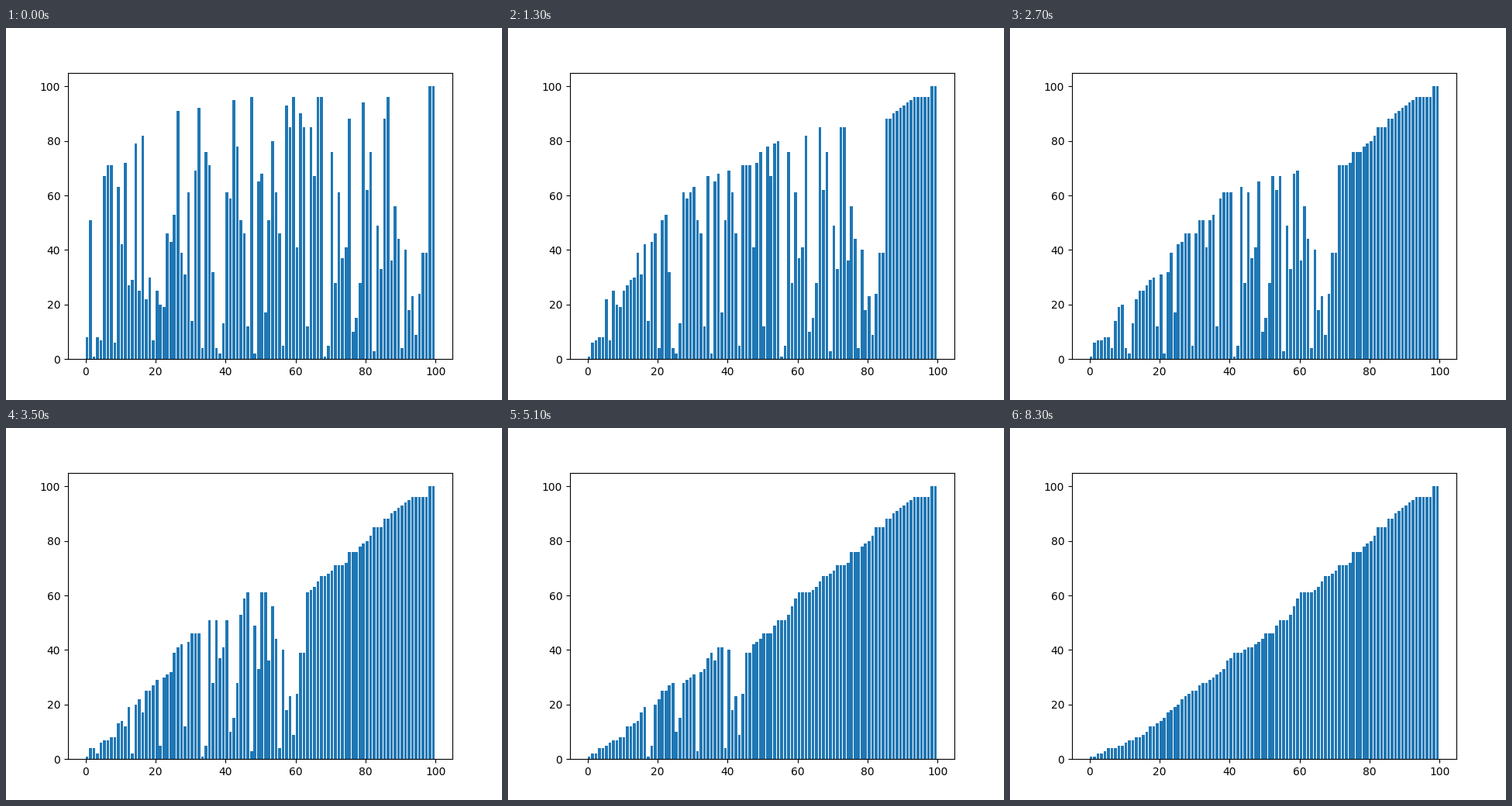
A matplotlib script for the animation above (9.9 s loop, 640x480 px).

```python
import matplotlib.pyplot as plt
from matplotlib.animation import FuncAnimation

STEP_MS = 100
FRAMES = 99

START = [
    8, 51, 1, 8, 7, 67, 71, 71, 6, 63,
    42, 72, 27, 29, 79, 25, 82, 22, 30, 7,
    25, 20, 19, 46, 43, 53, 91, 39, 31, 61,
    14, 69, 92, 4, 76, 71, 32, 4, 2, 13,
    61, 59, 95, 78, 51, 46, 12, 96, 2, 65,
    68, 17, 51, 80, 61, 46, 5, 93, 85, 96,
    41, 90, 85, 12, 85, 67, 96, 96, 1, 5,
    76, 28, 61, 37, 41, 88, 10, 15, 28, 94,
    62, 76, 3, 49, 33, 88, 96, 36, 56, 44,
    4, 40, 18, 23, 9, 24, 39, 39, 100, 100,
]


def bubble_pass(values):
    """Return a copy of values after one left-to-right bubble sort pass."""
    out = list(values)
    for i in range(len(out) - 1):
        if out[i] > out[i + 1]:
            out[i], out[i + 1] = out[i + 1], out[i]
    return out


states = [START]
while len(states) < FRAMES:
    states.append(bubble_pass(states[-1]))

fig, ax = plt.subplots(figsize=(6.4, 4.8), dpi=100)
bars = ax.bar(range(len(START)), START, align="edge")


def update(frame):
    for bar, height in zip(bars, states[frame]):
        bar.set_height(height)
    return bars.patches


anim = FuncAnimation(fig, update, frames=FRAMES, interval=STEP_MS,
                     repeat=True, repeat_delay=0, blit=False)
plt.show()
```
